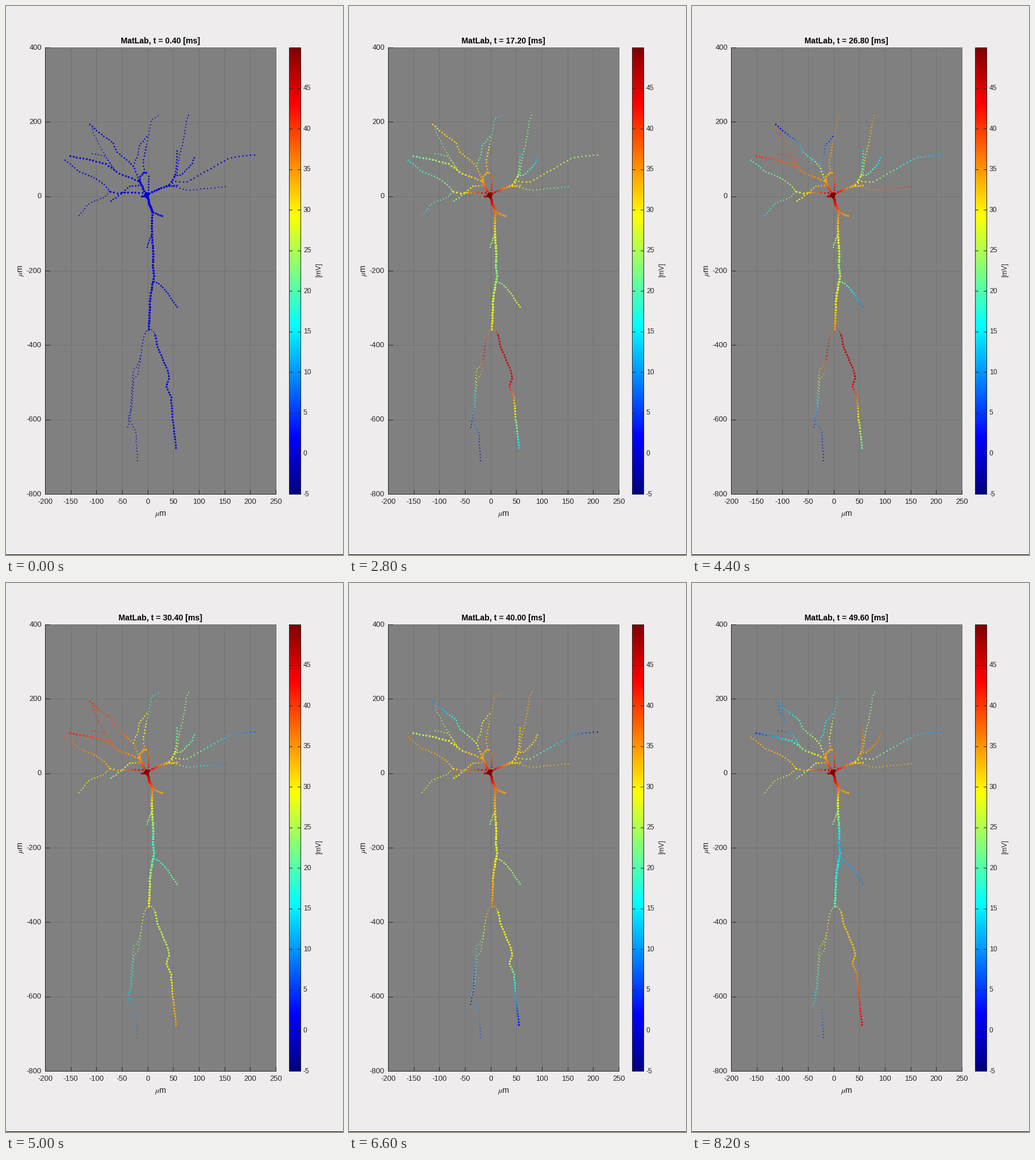
A matplotlib script for the animation above (8400 ms loop, 587x954 px).

```python
import numpy as np
import matplotlib.pyplot as plt
from matplotlib.animation import FuncAnimation
from matplotlib.colors import ListedColormap
from matplotlib.patches import Rectangle

W, H, DPI = 587, 954, 72          # at 72 dpi one point is one pixel
FRAMES, INTERVAL = 42, 200
L, R, T, B = 68, 470, 72, 848     # plot area
CL, CR = 493, 513                 # colour bar
VMIN, VMAX = -5, 50
INK = "#262626"
ONSET, PEAK = 15.0, 17.2          # ms: clamp switched on, first pulse done

plt.rcParams["font.family"] = "Liberation Sans"
plt.rcParams["mathtext.fontset"] = "stix"
rng = np.random.default_rng(4)

ramp = np.linspace(0, 1, 256)
jet = ListedColormap(np.clip(
    [1.5 - abs(4 * ramp - c) for c in (3, 2, 1)], 0, 1).T)


def wave(level, swing=0, period=1, phase=0):
    """Voltage at one point: a level plus a sine, phase in degrees at PEAK."""
    return lambda t: level + swing * np.cos(
        2 * np.pi * (t - PEAK) / period + np.radians(phase))


branches = []


def grow(size, start, end, *path, gap=5.4):
    """Dots along a path whose voltage goes over from start to end."""
    p = np.array(path, float)
    arc = np.r_[0, np.cumsum(np.hypot(*np.diff(p, axis=0).T))]
    u = np.linspace(0, 1, max(2, round(arc[-1] / gap) + 1))
    xy = np.c_[[np.interp(u * arc[-1], arc, c) for c in p.T]].T
    xy[1:-1] += rng.uniform(-0.5, 0.5, xy[1:-1].shape)
    branches.append((xy, np.full(len(u), size ** 2), u ** 0.8, start, end))


core, stem, hub = wave(50), wave(46), wave(34)

# apical tuft
fork = wave(26, 11, 12.9, 60)
tuft = wave(25, 21, 4.74, -10)
grow(2, fork, tuft, (249, 562), (243, 566), (238, 582), (236, 597))
grow(1.8, tuft, wave(4, 12, 6.1, -112), (236, 602), (229, 625), (222, 632),
     (219, 670), (217, 705), (212, 732))
grow(1.8, tuft, wave(8, 14, 4.74, 170), (235, 608), (230, 640), (223, 647),
     (219, 700), (213, 713), (217, 724), (226, 738), (229, 790))
grow(2, fork, tuft, (249, 562), (255, 563), (259, 570))
grow(3.3, tuft, tuft, (260, 573), (264, 591), (283, 638), (284, 648), gap=4.9)
grow(3.3, tuft, wave(22, 22, 6.1, -112), (282, 653), (279, 660), (288, 681),
     (289, 705), (296, 768), gap=4.9)

# trunk and its side branches
middle = wave(20, 8, 6.92, -75)
grow(4, wave(37), middle, (255, 358), (254, 400), (257, 430), (256, 455),
     gap=4.8)
grow(4, middle, fork, (257, 460), (258, 468), (251, 510), (249, 562), gap=4.8)
grow(3.4, wave(36), hub, (257, 359), (262, 361), (272, 365), gap=4.2)
grow(2.5, wave(25), wave(23), (253, 400), (250, 405), (246, 419), gap=4)
grow(2.7, middle, wave(18, 11, 6), (258, 479), (264, 481), (277, 493),
     (298, 523), gap=4.6)

# left basal dendrites
west = wave(28, 5, 9.35, -115)
grow(3.3, stem, west, (238, 325), (212, 324), (195, 326), (182, 323), gap=6)
grow(2.5, west, wave(23, 18, 9.35, -115), (182, 323), (170, 309), (157, 300),
     (127, 287), (103, 268))
grow(2, west, wave(18, 11, 9.35, -115), (180, 322), (173, 332), (145, 343),
     (127, 364))
grow(2.7, hub, wave(25, 6, 6.55, -130), (231, 312), (216, 313), (200, 327),
     (183, 339))

side = wave(28, 10, 45, -98)
far = wave(23, 19, 45, -98)
grow(3.3, hub, far, (230, 304), (195, 290), (175, 275), (145, 267),
     (112, 261), gap=5.8)
grow(2, side, far, (187, 281), (173, 261), (150, 257))
grow(1.8, side, far, (187, 283), (165, 246), (151, 219), (151, 209))
grow(2.7, hub, wave(20, 21, 7.2, 60), (232, 303), (222, 278), (192, 252),
     (187, 238), (165, 222), (146, 206))
grow(2.3, wave(22, 8, 8, 90), wave(18, 15, 8, 90), (222, 278), (230, 258),
     (232, 243), (245, 227))

# middle dendrites
north = wave(24, 16, 6.55, -130)
south = wave(30, 5, 6.55, -130)
grow(3.6, hub, hub, (233, 305), (234, 297), (240, 290), (244, 290), gap=4)
grow(2.5, hub, south, (241, 289), (239, 270), (244, 245))
grow(1.9, south, north, (245, 240), (251, 212), (253, 198), (265, 191))
grow(2.8, stem, wave(37), (248, 325), (249, 296), gap=4.5)

# right basal dendrites
east = wave(32)
knee = wave(29, 5, 55, 158)
late = wave(24, 13, 55, 158)
grow(2.5, east, wave(18, 15, 72, 70), (284, 311), (293, 305), (316, 306),
     (345, 289), (390, 264), (415, 260), (433, 259), gap=6.8)
grow(2, east, wave(25, 17, 7.24, -115), (285, 312), (310, 319), (320, 320),
     (382, 314), gap=6)
grow(2.7, knee, late, (294, 296), (306, 293), (323, 276), (328, 264), gap=5)
grow(2.7, knee, late, (295, 293), (297, 280), (298, 252), gap=5)
grow(2.1, knee, wave(28, 9, 6.55, -130), (298, 290), (300, 270), (310, 230),
     (314, 200), (318, 190))
grow(3.2, east, knee, (285, 310), (292, 300), (295, 293), gap=4.6)
grow(3, east, east, (280, 314), (298, 312), gap=4.8)
grow(3.8, stem, east, (250, 326), (266, 318), (284, 312), gap=4.4)

# soma
grow(4.2, stem, hub, (246, 328), (240, 320), (232, 303), gap=4)
grow(4.5, core, wave(37), (247, 331), (250, 345), (255, 358), gap=3.2)
grow(4, stem, core, (237, 331), (244, 330), gap=3.5)
for x, y in rng.normal((246.5, 328), 1.8, (9, 2)):
    grow(4.4, core, core, (x, y), (x, y))

dots = np.vstack([b[0] for b in branches])
sizes = np.hstack([b[1] for b in branches])
dist = np.hypot(*(dots - (246, 328)).T)

fig = plt.figure(figsize=(W / DPI, H / DPI), dpi=DPI, facecolor="#eeeced")
ax = fig.add_axes([0, 0, 1, 1])
ax.axis("off")


def line(x0, y0, x1, y1, color=INK, z=2):
    ax.plot([x0, x1], [y0, y1], color=color, lw=1, zorder=z)


def label(x, y, text, size=13, ha="center", va="center", **kw):
    return ax.text(x, y, text, size=size, ha=ha, va=va,
                   **{"color": INK, **kw})


ax.add_patch(Rectangle((L, T), R - L, B - T, fc="#808080", lw=0))
for v in range(-200, 251, 50):
    x = L + (v + 200) * (R - L) / 450
    line(x, T, x, B, "#727272", 1)
    line(x, B - 7, x, B)
    label(x, 862, str(v))
for v in range(-800, 401, 200):
    y = B - (v + 800) * (B - T) / 1200
    line(L, y, R, y, "#727272", 1)
    line(L, y, L + 8, y)
    label(62, y + 0.5, str(v), ha="right")
line(L, T, L, B)
line(L, B, R, B)
label(269, 886, r"$\mu$m", 14.3, va="baseline")
label(26, 460, r"$\mu$m", 14.3, rotation=90)

ax.imshow(np.linspace(VMAX, VMIN, 256)[:, None], cmap=jet, aspect="auto",
          extent=(CL, CR, B, T), interpolation="nearest")
for v in range(-5, 46, 5):
    y = B - (v - VMIN) * (B - T) / (VMAX - VMIN)
    line(CL, y, CL + 5, y)
    line(CR - 5, y, CR, y)
    label(518, y + 0.5, str(v), 12, ha="left")
ax.add_patch(Rectangle((CL, T), CR - CL, B - T, fc="none", ec=INK, lw=1,
                       zorder=3))
label(545, 459, "[mV]", 12, rotation=90)
line(0, 953, W, 953, "black")

title = label(269, 65, "", 14, va="baseline", weight="bold", color="black")
cells = ax.scatter(*dots.T, s=sizes, c=dist, cmap=jet, vmin=VMIN,
                   vmax=VMAX, lw=0, zorder=4)
ax.set_xlim(0, W)
ax.set_ylim(H, 0)


def voltage(t):
    v = np.hstack([(1 - u) * start(t) + u * end(t)
                   for _, _, u, start, end in branches])
    front = np.clip(1.5 * (t - ONSET) - dist / 200, 0, 1)
    return np.clip(v * front, VMIN, VMAX)


def update(k):
    t = 0.4 + 1.2 * k
    cells.set_array(voltage(t))
    title.set_text(f"MatLab, t = {t:.2f} [ms]")
    return cells, title


anim = FuncAnimation(fig, update, frames=FRAMES, interval=INTERVAL,
                     repeat=True, repeat_delay=0)
plt.show()
```
